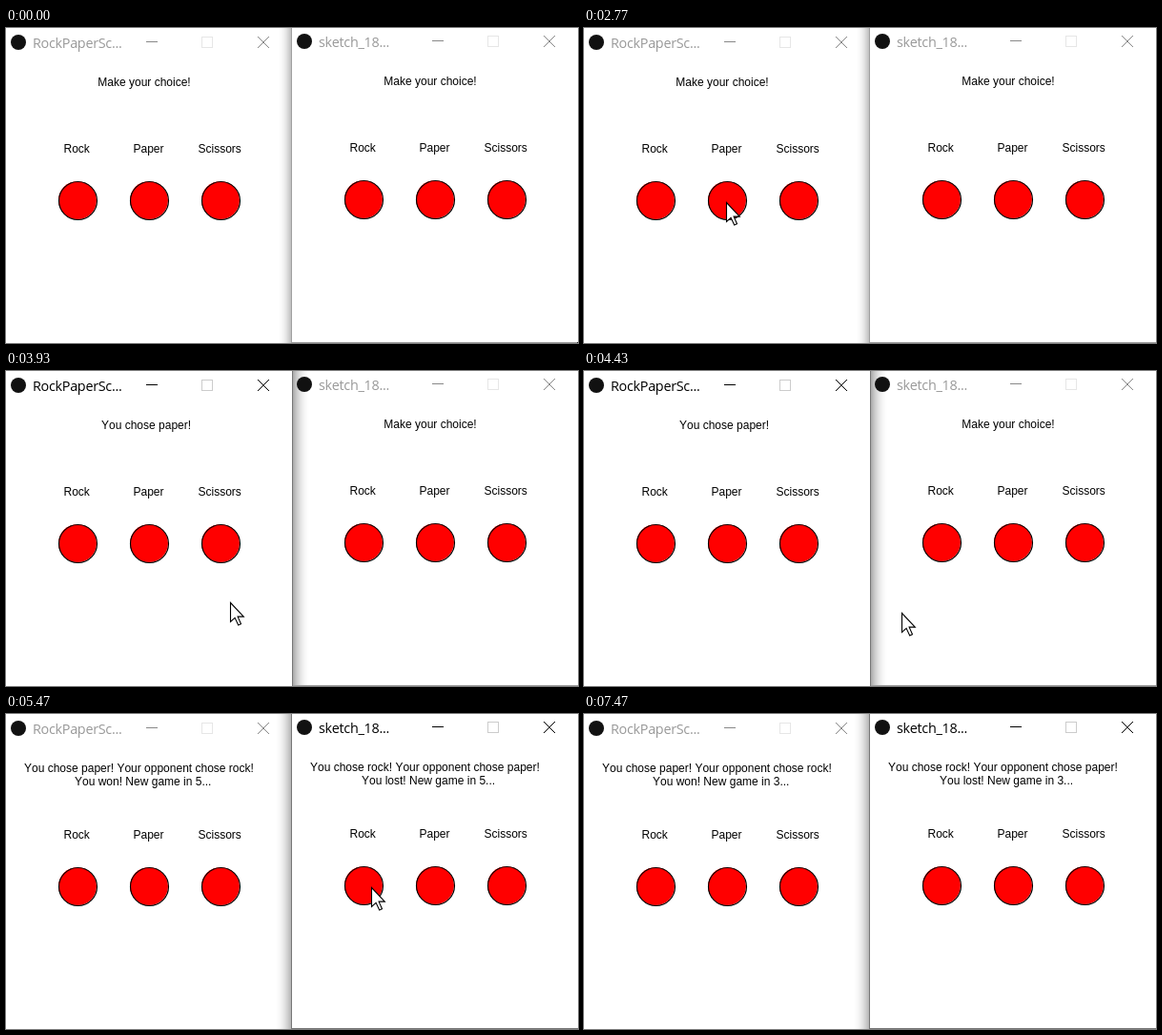
Animation of 600 by 331 pixels, one loop 8 s. Source, as an HTML page with a canvas:

```html
<!DOCTYPE html>
<html lang="en">
<head>
<meta charset="utf-8">
<title>Rock, paper, scissors</title>
<style>
html, body { margin: 0; width: 100%; height: 100%; overflow: hidden; background: #fff; }
canvas { display: block; }
</style>
</head>
<body>
<canvas id="stage" width="600" height="331"></canvas>
<script>
const W = 600, H = 331, LOOP = 8000;
const ctx = document.getElementById('stage').getContext('2d');
const BODY = '12px "Liberation Sans", Arial, sans-serif';
const TITLE = '14.4px "Open Sans", "Noto Sans", sans-serif';

// Pointer path: time, x, y
const PATH = [
  [2030, 243, 326], [2400, 186, 238], [2770, 149, 183], [3170, 149, 183],
  [3470, 166, 217], [3770, 197, 240], [3930, 235, 243], [4250, 300, 252],
  [4600, 359, 246], [4930, 390, 177], [5070, 390, 177], [5190, 383, 182],
  [6130, 383, 182], [6500, 379, 246], [6870, 370, 336]
];
const ARROW = [[0, 0], [0, 20], [4.6, 15.8], [8.2, 23.5], [11, 22.3], [7.6, 14.6], [13.8, 14.6]];

function slope(i, k) {
  const a = PATH[i - 1], b = PATH[i], c = PATH[i + 1];
  const still = (p, q) => p[1] === q[1] && p[2] === q[2];
  if (!a) return (c[k] - b[k]) / (c[0] - b[0]);
  if (!c) return (b[k] - a[k]) / (b[0] - a[0]);
  if (still(a, b) || still(b, c)) return 0;
  return (c[k] - a[k]) / (c[0] - a[0]);
}

function pointerAt(t) {
  const i = PATH.findIndex((p, n) => n + 1 < PATH.length && t >= p[0] && t < PATH[n + 1][0]);
  if (i < 0) return null;
  const a = PATH[i], b = PATH[i + 1], d = b[0] - a[0];
  const u = (t - a[0]) / d, v = 1 - u;
  return [1, 2].map(k =>
    v * v * (1 + 2 * u) * a[k] + u * u * (3 - 2 * u) * b[k] +
    d * u * v * (v * slope(i, k) - u * slope(i + 1, k)));
}

function text(str, x, y, font = BODY, color = '#000', spacing = '0px') {
  ctx.font = font;
  ctx.letterSpacing = spacing;
  ctx.fillStyle = color;
  ctx.fillText(str, x, y);
}

function disc(x, y, r, color) {
  ctx.fillStyle = color;
  ctx.beginPath();
  ctx.arc(x, y, r, 0, Math.PI * 2);
  ctx.fill();
}

function button(x, y) {
  disc(x, y, 20, '#f00');
  ctx.strokeStyle = '#000';
  ctx.lineWidth = 1.15;
  ctx.beginPath();
  ctx.arc(x + 0.5, y + 0.5, 20, 0, Math.PI * 2);
  ctx.stroke();
}

function titleBar(title, active) {
  disc(13, 15, 8, '#111');
  text(title, 28, 21, TITLE, active ? '#000' : '#999', '-0.3px');
  ctx.lineWidth = 1;
  ctx.strokeStyle = active ? '#ccc' : '#e6e6e6';
  ctx.strokeRect(205.5, 9.5, 11, 11);
  ctx.strokeStyle = ctx.fillStyle = active ? '#000' : '#888';
  ctx.fillRect(147, 14, 12, 1);
  ctx.beginPath();
  ctx.moveTo(264, 9); ctx.lineTo(276, 21);
  ctx.moveTo(276, 9); ctx.lineTo(264, 21);
  ctx.stroke();
}

function appWindow(x, y, title, active, lines) {
  ctx.save();
  ctx.translate(x, y);
  titleBar(title, active);
  lines.forEach(([str, tx], i) => text(str, tx, 61 + 14 * i));
  [['Rock', 60.5], ['Paper', 133.5], ['Scissors', 201.5]].forEach(([name, tx], i) => {
    text(name, tx, 131);
    button(75 + 75 * i, 181);
  });
  ctx.restore();
}

function shadow(from, dir, reach, strength) {
  for (let i = 0; i < reach; i++) {
    const a = strength * (1 - i / reach) ** 2;
    ctx.fillStyle = `rgba(0,0,0,${a})`;
    ctx.fillRect(from + dir * i, 0, 1, H);
  }
}

function frame(focus, t) {
  const edge = focus === 'left' ? 300 : 299;
  if (focus === 'left') shadow(301, 1, 18, 0.32);
  else shadow(298, -1, focus ? 17 : 14, focus ? 0.28 : 0.24);
  ctx.fillStyle = focus === 'right' ? '#777' : '#a0a0a0';
  ctx.fillRect(edge, H - 1, W - edge, 1);
  ctx.fillStyle = focus ? '#777' : '#a0a0a0';
  ctx.fillRect(edge, 0, 1, H);
  if (t < 100) {
    ctx.fillStyle = '#222';
    ctx.fillRect(W - 1, H - 1, 1, 1);
  }
}

function pointer(t) {
  const p = pointerAt(t);
  if (!p) return;
  ctx.save();
  ctx.translate(Math.round(p[0]) + 0.5, Math.round(p[1]) + 0.5);
  ctx.beginPath();
  ARROW.forEach(q => ctx.lineTo(...q));
  ctx.closePath();
  ctx.fillStyle = '#fff';
  ctx.fill();
  ctx.strokeStyle = '#000';
  ctx.lineWidth = 1.1;
  ctx.stroke();
  ctx.restore();
}

const START = [['Make your choice!', 96.3]];

function result(t, shown, mine, other, verdict, x) {
  const count = 5 - Math.floor((t - shown) / 1000);
  return [
    [`You chose ${mine}! Your opponent chose ${other}!`, 19],
    [`You ${verdict}! New game in ${count}...`, x]
  ];
}

function leftLines(t) {
  if (t < 3070) return START;
  if (t < 5430) return [['You chose paper!', 100]];
  return result(t, 5430, 'paper', 'rock', 'won', 72);
}

function rightLines(t) {
  return t < 5470 ? START : result(t, 5470, 'rock', 'paper', 'lost', 73);
}

function draw(t) {
  const focus = t < 2970 ? '' : t < 5300 ? 'left' : 'right';
  ctx.fillStyle = '#fff';
  ctx.fillRect(0, 0, W, H);
  ctx.fontKerning = 'none';
  frame(focus, t);
  appWindow(0, 0, 'RockPaperSc...', focus === 'left', leftLines(t));
  appWindow(300, -1, 'sketch_18...', focus === 'right', rightLines(t));
  pointer(t);
}

const begin = performance.now();
function tick() {
  draw((performance.now() - begin) % LOOP);
  requestAnimationFrame(tick);
}
tick();
</script>
</body>
</html>
```
